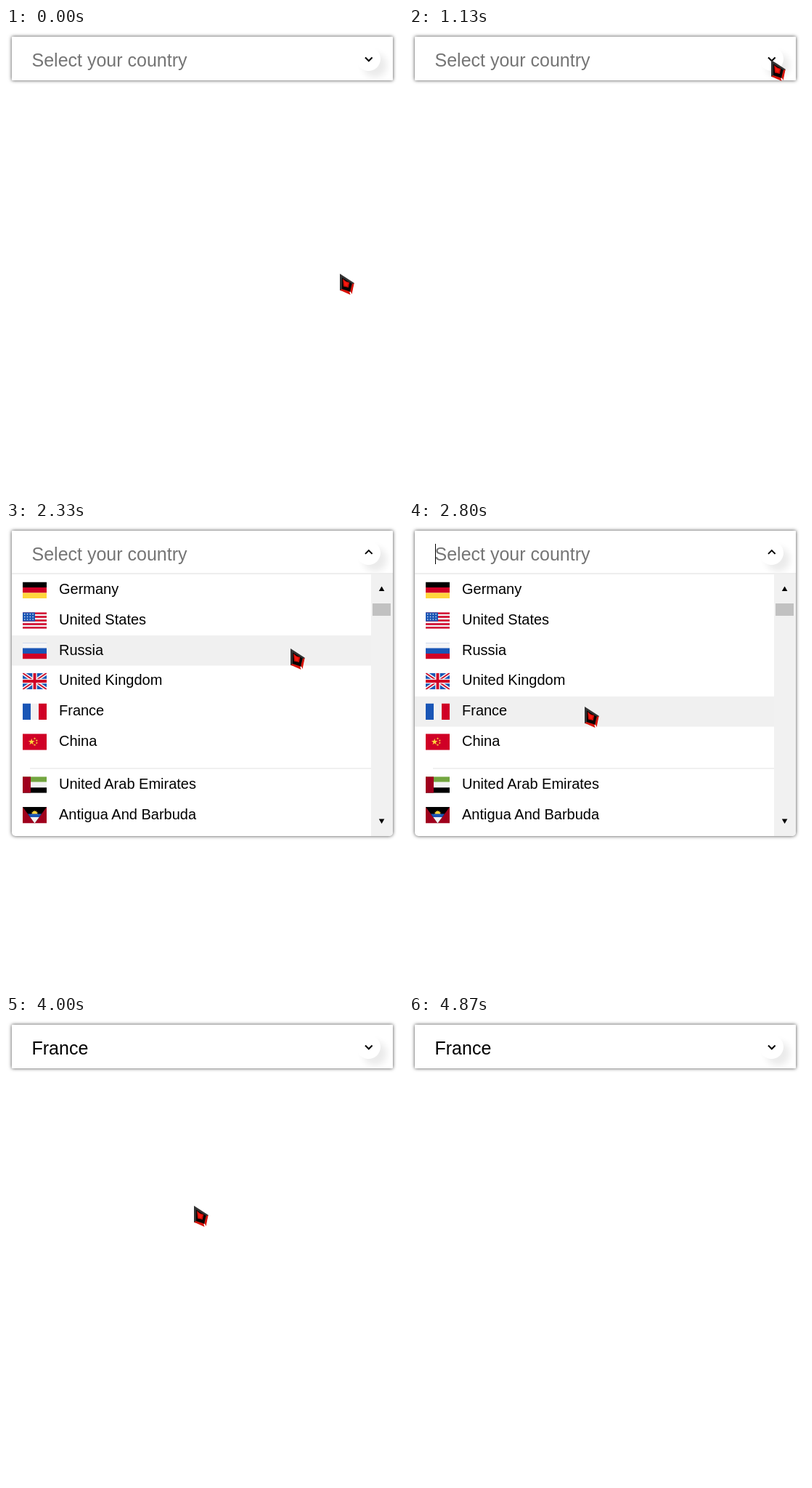
An HTML page that plays this animation: 547x641 px, repeating every 5.39 s.

```html
<!DOCTYPE html>
<html lang="en">
<head>
<meta charset="utf-8">
<title>Country select</title>
<style>
  html, body { margin: 0; width: 100%; height: 100%; overflow: hidden; background: #fff; }
  body { position: relative; }
  svg { position: absolute; overflow: visible; }
  #panel {
    position: absolute; left: 8px; top: 12px; width: 525px; height: 60px;
    overflow: hidden; background: #fff; box-shadow: 0 0 5px #444;
  }
  #panel svg { left: -8px; top: -12px; width: 547px; height: 641px; }
  #header { position: absolute; width: 525px; height: 60px; overflow: hidden; }
  #button {
    position: absolute; left: 475px; top: 14px; width: 33px; height: 33px;
    border-radius: 50%; background: #fff; box-shadow: 9px 9px 10px #ebebeb;
  }
  text { font-family: "Liberation Sans", Arial, sans-serif; font-size: 20px; }
  #value { font-size: 25px; }
  #pointer { left: 0; top: 0; width: 20px; height: 30px; }
</style>
</head>
<body>
<div id="panel">
  <div id="header"><div id="button"></div></div>
  <svg>
    <text id="value" x="35.5" y="53"></text>
    <rect id="caret" x="36" y="30" width="1" height="28"/>
    <path id="chevron" d="M495 40.5l4.8 4.8 4.8-4.8" fill="none" stroke="#000" stroke-width="2"/>
    <g id="list">
      <rect x="8" y="70" width="525" height="2" fill="#eee"/>
      <rect id="hover" x="8" width="525" height="41.5" fill="#f0f0f0"/>
      <g id="rows"></g>
      <rect x="33" y="338" width="500" height="2" fill="#f0f0f0"/>
    </g>
    <g id="scrollbar">
      <rect x="503" y="72" width="30" height="360" fill="#f1f1f1"/>
      <path d="M513.8 95h7.6l-3.8-6.5z"/>
      <rect id="thumb" x="505" y="112" width="25" height="17" fill="#c1c1c1"/>
      <path id="down" d="M513.8 408.5h7.6l-3.8 6.5z"/>
    </g>
  </svg>
</div>
<svg id="pointer" viewBox="0 0 20 30">
  <path d="M0 0L19.7 12.7 16 24 14 25 0 23z" fill="#333"/>
  <path d="M0 22.5L14.5 29 13 24 3 21z" fill="#d81208"/>
  <path d="M19.6 13L16.6 28 14.3 23.5 17 14z" fill="#d81208"/>
  <path d="M3 5.5L16.5 13.5 14 24.5 3 21z" fill="#080303"/>
  <path d="M4 7L8.5 10.5 13.3 12 11.8 19 5 17.5z" fill="#c90c08"/>
  <path d="M5.5 9.5L9 12 11.5 13 10 17.5 6.5 16z" fill="#fa1a10"/>
</svg>

<script>
const RED = '#d00026', BLUE = '#1a56b6', WHITE = '#f2f2f2', GOLD = '#ffd63c', MAROON = '#a0001d';
const $ = id => document.getElementById(id);

const bar = (fill, x, y, w, h) => `<rect x="${x}" y="${y}" width="${w}" height="${h}" fill="${fill}"/>`;
const path = (fill, d) => `<path d="${d}" fill="${fill}"/>`;
const line = (color, width, d) => `<path d="${d}" fill="none" stroke="${color}" stroke-width="${width}"/>`;
const rowsOf = colors => colors.map((c, i) => bar(c, 0, i * 7.5, 33, 7.5)).join('');
const columnsOf = colors => colors.map((c, i) => bar(c, i * 11, 0, 11, 22.5)).join('');

function star(cx, cy, r, points = 5, inner = 0.4) {
  let d = '';
  for (let i = 0; i < points * 2; i++) {
    const a = i * Math.PI / points, q = i % 2 ? r * inner : r;
    d += `${i ? 'L' : 'M'}${(cx + q * Math.sin(a)).toFixed(2)} ${(cy - q * Math.cos(a)).toFixed(2)}`;
  }
  return path(GOLD, d + 'z');
}

function usFlag() {
  let out = bar(WHITE, 0, 0, 33, 22.5);
  for (let i = 0; i < 5; i++) out += bar(RED, 0, i * 5, 33, 2.5);
  out += bar(BLUE, 0, 0, 17, 12.3);
  for (let i = 0; i < 12; i++) {
    out += `<circle cx="${2.7 + i % 4 * 3.8}" cy="${2.6 + Math.floor(i / 4) * 3.6}" r=".8" fill="${WHITE}"/>`;
  }
  return out;
}

const cross = 'M16.5 0V22.5M0 11.25H33', saltire = 'M0 0L33 22.5M33 0L0 22.5';
const flags = {
  'Germany': rowsOf(['#000', RED, GOLD]),
  'United States': usFlag(),
  'Russia': rowsOf(['#f5f5f7', BLUE, RED]) + bar('#c6d2ec', 0, 0, 33, 0.8),
  'United Kingdom': bar(BLUE, 0, 0, 33, 22.5) + line(WHITE, 5, saltire) + line(RED, 1.8, saltire) +
    line(WHITE, 6.6, cross) + line(RED, 3.8, cross),
  'France': columnsOf([BLUE, WHITE, RED]),
  'China': bar(RED, 0, 0, 33, 22.5) + star(12.2, 11.2, 4.6) + star(16.5, 6.6, 1.7) +
    star(19.3, 9.2, 1.7) + star(19.3, 12.7, 1.7) + star(16.5, 15.4, 1.7),
  'United Arab Emirates': rowsOf(['#73a640', WHITE, '#000']) + bar(MAROON, 0, 0, 11, 22.5),
  'Antigua And Barbuda': bar(MAROON, 0, 0, 33, 22.5) + path('#000', 'M0 0H33L16.5 22.5z') +
    star(16.5, 9.5, 5, 12, 0.65) + path(BLUE, 'M7 9.5H26L22.7 14H10.3z') +
    path(WHITE, 'M10.3 14H22.7L16.5 22.5z')
};
const names = Object.keys(flags);
const chosenOrder = ['France', ...names.filter(n => n !== 'France')];
const rowTop = i => 72.5 + 41.75 * i + (i > 5 ? 17.25 : 0);

$('rows').innerHTML = names.map(name =>
  `<g><svg x="23" width="33" height="22.5" style="overflow:hidden">${flags[name]}</svg><text x="73">${name}</text></g>`
).join('');
const rows = [...$('rows').children];

// Pointer stops: tick, x, y
const stops = [
  [0, 460, 338], [3, 465, 208], [5, 465, 208], [14, 498, 54], [17, 499, 44], [26, 499, 44],
  [35, 392, 174], [44, 226, 261], [56, 226, 261], [60, 259, 261], [65, 272, 289],
  [66, 284, 282], [67, 286, 298], [69, 252, 395], [72, 133, 610], [81, 133, 610]
];

// Slope through a stop; zero where the pointer rests
function slope(i, axis) {
  const a = stops[i - 1], b = stops[i], c = stops[i + 1];
  if (!a || !c || (b[axis] - a[axis]) * (c[axis] - b[axis]) <= 0) return 0;
  return (c[axis] - a[axis]) / (c[0] - a[0]);
}

function pointerAt(tick, axis) {
  const i = stops.findIndex((s, n) => n + 1 === stops.length - 1 || stops[n + 1][0] >= tick);
  const a = stops[i], b = stops[i + 1], span = b[0] - a[0], u = (tick - a[0]) / span;
  const s = u * u * (3 - 2 * u);
  return a[axis] + (b[axis] - a[axis]) * s +
    span * (slope(i, axis) * u * (1 - u) ** 2 - slope(i + 1, axis) * u * u * (1 - u));
}

// The CSS "ease" curve
function ease(x) {
  if (x <= 0 || x >= 1) return x <= 0 ? 0 : 1;
  let lo = 0, hi = 1;
  for (let i = 0; i < 20; i++) {
    const m = (lo + hi) / 2;
    if (0.75 * m * (1 - m) + m ** 3 < x) lo = m; else hi = m;
  }
  return 0.3 * lo * (1 - lo) ** 2 + 3 * lo * lo * (1 - lo) + lo ** 3;
}

const LOOP = 5390, TICK = 1000 / 15, OPEN = 20, CHOOSE = 51, EXIT = 73;
const show = (id, on) => { $(id).style.display = on ? '' : 'none'; };
let lastTick = -1;

function draw(tick) {
  const chosen = tick >= CHOOSE, open = tick >= OPEN && !chosen;
  const unfold = start => ease((tick - start + 0.27) * TICK / 200);
  const height = 360 * (unfold(OPEN) - unfold(CHOOSE));
  const x = Math.round(pointerAt(tick, 1)), y = Math.round(pointerAt(tick, 2));

  $('panel').style.height = 60 + height + 'px';
  $('panel').style.borderRadius = height ? '1px 1px 5px 5px' : '1px';
  $('value').textContent = chosen ? 'France' : 'Select your country';
  $('value').setAttribute('fill', chosen ? '#000' : '#757575');
  $('chevron').setAttribute('transform', open ? 'rotate(180 499.8 42.2)' : '');
  show('caret', (tick >= OPEN && tick < 28) || (tick >= 36 && tick < 43));
  show('list', height > 0);
  show('scrollbar', open);
  show('thumb', height > 90);
  $('down').setAttribute('transform', `translate(0 ${height - 360})`);

  const order = chosen ? chosenOrder : names;
  rows.forEach((row, i) => {
    const top = rowTop(order.indexOf(names[i]));
    row.children[0].setAttribute('y', top + 10);
    row.children[1].setAttribute('y', Math.round(top + 26.7));
  });
  const hovered = names.findIndex((n, i) => y >= rowTop(i) && y < rowTop(i) + 41.75);
  show('hover', hovered >= 0 && x < 503);
  if (hovered >= 0) $('hover').setAttribute('y', Math.round(rowTop(hovered)));

  show('pointer', tick < EXIT);
  $('pointer').style.transform = `translate(${x}px, ${y}px)`;
}

function play() {
  const tick = Math.floor((performance.now() % LOOP + 3.4) / TICK);
  if (tick !== lastTick) draw(lastTick = tick);
  requestAnimationFrame(play);
}
play();
</script>
</body>
</html>
```
